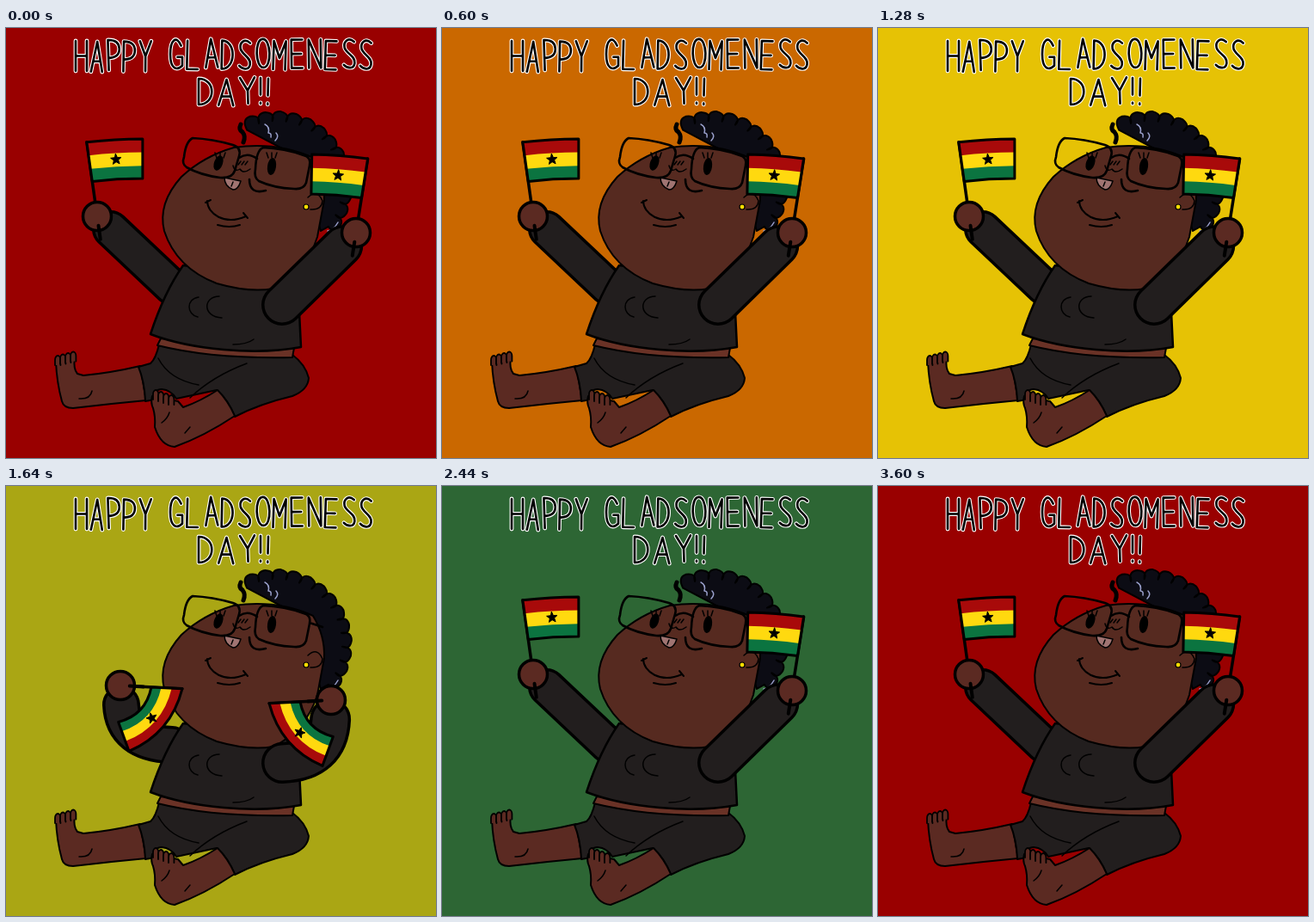
Animation, 500 px wide and 500 px high, one loop 3640 ms. Source, as an HTML page:

```html
<!DOCTYPE html>
<html lang="en">
<head>
<meta charset="utf-8">
<title>Happy Gladsomeness Day</title>
<style>
html, body { margin: 0; width: 100%; height: 100%; overflow: hidden; background: #900; }
svg { display: block; width: 100vw; height: 100vh; }
svg * { stroke-linecap: round; stroke-linejoin: round; }
.skin { fill: #562a20; }
.limb { fill: #5b2a22; }
.cloth { fill: #221e1e; }
.line, #title path { fill: none; }
#title path { vector-effect: non-scaling-stroke; }
</style>
</head>
<body>
<svg viewBox="0 0 500 500" stroke="#000" stroke-width="2" role="img" aria-label="Happy Gladsomeness Day!!">
  <g id="title"></g>
  <g id="leftSleeve" class="line"></g>

  <g id="legs">
    <path class="limb" d="M156 393Q122 401 90 404L83 402Q78 396 80 384L58 388Q59 412 65 434Q67 442 78 442Q120 437 163 433Z"/>
    <path class="cloth" d="M178 368Q174 385 168 390L154 394Q161 411 162 434L173 432Q172 420 181 420Q192 421 198 431L245 421Q259 433 266 452Q295 437 333 428Q351 421 352 407Q348 391 333 380Z"/>
    <path class="limb" d="M246 421Q226 434 206 441L200 434L170 428Q168 436 171 442Q174 452 173 464Q180 486 196 487Q230 475 266 451Q258 433 246 421Z"/>
    <path class="line" stroke-width="1.5" d="M85 431Q98 432 100 422M181 459Q188 454 190 447M208 471L214 464M177 384Q190 409 224 415M214 430Q240 405 280 390"/>
    <g id="toes" class="limb" stroke-width="1.8"></g>
  </g>

  <path fill="#6a3226" d="M180 361L176 369Q240 385 333 383L335 372Z"/>
  <path class="cloth" stroke-width="2.5" d="M206 276Q184 307 168 356C215 374 290 381 343 371L341 330L325 290Z"/>
  <path class="line" stroke-width="1.5" d="M224 313C209 315 210 333 223 336M248 312C229 312 228 336 251 337M264 368Q280 368 288 362"/>

  <g id="head">
    <path id="hair" fill="#0c0c14"/>
    <path class="line" stroke-width="5" d="M273 112Q270 118 275 121Q279 126 276 133"/>
    <path class="line" stroke="#9aa0cc" stroke-width="1.5" d="M301 112Q307 115 305 122Q309 122 308 127M314 122Q318 126 313 131M374 236Q381 235 386 226"/>
    <path class="skin" d="M265 139Q230 149 204 173Q176 204 184 236Q198 279 245 297Q283 308 311 303Q349 284 362 243L370 200Q371 174 357 151Q316 132 265 139Z"/>
    <path class="skin" stroke-width="1.5" d="M351 197Q362 187 368 201Q367 212 354 211"/>
    <circle cx="349" cy="208" r="3" fill="#fd0" stroke-width="1.2"/>
    <path class="line" d="M234 201C234 216 254 230 279 219M232 203L238 200M246 229Q260 233 272 229M276 215L281 221"/>
    <path fill="#a07472" stroke-width="1.5" d="M254 174L273 178Q270 188 264 188Q254 184 254 174Z"/>
    <path class="line" stroke-width="1.5" d="M262 184L264 179M264 160Q266 168 272 164Q276 170 284 164"/>
    <ellipse cx="247" cy="157" rx="4" ry="8" transform="rotate(20 247 157)"/>
    <ellipse cx="309" cy="161" rx="4" ry="9" transform="rotate(8 309 161)"/>
    <g id="lashes" stroke-width="1.5"></g>
    <path class="line" stroke-width="2.6" d="M217 128Q240 129 264 136Q274 139 271 149L266 166Q263 175 249 174Q226 171 210 162Q204 158 207 150Q209 132 217 128ZM299 139Q324 140 346 148Q355 150 353 160L349 180Q346 188 335 187Q311 186 294 178Q288 174 290 164Q291 142 299 139ZM271 151Q281 144 292 152M353 159L368 164M283 176Q283 194 302 189"/>
  </g>

  <g id="rightSleeve" class="line"></g>
  <g id="flags"></g>
</svg>

<script>
const FRAME = 40, LOOP = 3640, CYCLE = 600;
const $ = id => document.getElementById(id);
const repeat = (n, make) => Array.from({ length: n }, (_, i) => make(i)).join('');
const mix = (a, b, k) => a.map((v, i) => v + (b[i] - v) * k);
// The point at a distance from [x, y], in a direction in degrees
const move = ([x, y], degrees, distance) => {
  const a = degrees * Math.PI / 180;
  return [x + distance * Math.cos(a), y + distance * Math.sin(a)];
};

// Hand-lettered strokes on a 10 x 10 cell
const GLYPHS = {
  H: 'M0 0V10M10 0V10M0 5H10',
  A: 'M0 10L5 0L10 10M2 6.5H8',
  P: 'M0 10V0Q10 0 10 3T0 6',
  Y: 'M0 0L5 5L10 0M5 5V10',
  G: 'M9 2C5 -2 0 0 0 5S5 11 10 9V6H6',
  L: 'M0 0V10H9',
  D: 'M0 0V10C12 10 12 0 0 0',
  S: 'M9 1C4 -1 0 1 1 3S10 6 9 8.5S2 10 0 9',
  O: 'M5 0C-2 0 -2 10 5 10S12 0 5 0',
  M: 'M0 10V0L5 6L10 0V10',
  E: 'M9 0H0V10H9M0 5H8',
  N: 'M0 10V0L10 10V0',
  '!': 'M5 0V6.5M5 9.6V10'
};

function write(word, x, y, width, height, step) {
  $('title').innerHTML += repeat(word.length, i => {
    const wobble = Math.sin(i * 2.3);
    const place = `translate(${x + i * step} ${y + wobble}) rotate(${wobble * 2}) scale(${width / 10} ${height / 10})`;
    const stroke = (color, size) =>
      `<path d="${GLYPHS[word[i]]}" transform="${place}" stroke="${color}" stroke-width="${size}"/>`;
    return stroke('#fff', 4.8) + stroke('#000', 2.6);
  });
}

function drawDetails() {
  write('HAPPY', 81, 15, 13, 35, 18.7);
  write('GLADSOMENESS', 191, 14, 14, 33, 20.1);
  write('DAY', 224, 59, 17, 30, 24);
  write('!!', 291, 58, 10, 30, 9);

  const toes = (x, y, slope) => repeat(4, i =>
    `<path d="M${x + i * 6} ${y + i * slope + 4}v-6a3.2 5 0 0 1 6.4 0v6"/>`);
  $('toes').innerHTML = toes(57, 388, -1.5) + toes(171, 428, 2);

  const lashes = (x, y) => repeat(3, i => `<path d="M${x + i * 4} ${y}l${i * 2 - 2} -6"/>`);
  $('lashes').innerHTML = lashes(245, 151) + lashes(305, 151)
    + repeat(3, i => `<path d="M${270 + i * 4} 159l3 -4"/>`);

  // Pointed tufts around the crown
  const crown = [315, 184], count = 13, start = -118, step = 12;
  $('hair').setAttribute('d', `M${move(crown, start, 74)}` + repeat(count, i => {
    const a = start + i * step;
    return `Q${move(crown, a, 88)} ${move(crown, a + 7, 87)}Q${move(crown, a + 15, 85)} ${move(crown, a + step, 76)}`;
  }) + 'L366 236L340 150Z');
}

// Arm: hand x, hand y, pole angle, cloth curl, elbow bend
const LEFT = { side: 1, shoulder: [193, 301], width: 40,
  up: [106, 219, 262, 8, 0], down: [143, 234, 48, 74, 1], in: [133, 232, 3, 67, 1] };
const RIGHT = { side: -1, shoulder: [321, 322], width: 44,
  up: [407, 238, -81, 8, 0], down: [379, 254, 71, 40, 1], in: [378, 249, 177, 67, 1] };

// Held drawings: up, swinging out, down, folded in, rising
function poses({ side, up, down, in: folded }) {
  const out = mix(up, down, 0.5);
  out[0] -= 28 * side;
  const nextUp = up.map((v, i) => i === 2 ? v - 360 * side : v);
  return [up, out, down, folded, mix(folded, nextUp, 0.5)];
}
LEFT.poses = poses(LEFT);
RIGHT.poses = poses(RIGHT);

function sleeve({ shoulder, width }, [x, y, , , bend]) {
  const elbow = mix(mix([x, y], shoulder, 0.5), [x, shoulder[1] + 2], bend * 0.9);
  const toElbow = Math.atan2(elbow[1] - y, elbow[0] - x) * 180 / Math.PI;
  const d = `M${move([x, y], toElbow, 22)}Q${elbow} ${shoulder}`;
  return `<path d="${d}" stroke-width="${width + 4}"/><path d="${d}" stroke="#221e1e" stroke-width="${width - 3}"/>`;
}

function star([x, y], angle) {
  const points = Array.from({ length: 10 }, (_, i) => move([x, y], angle + i * 36, i % 2 ? 2.8 : 6.5));
  return `<polygon points="${points.join(' ')}" stroke-width="1"/>`;
}

function flag({ side }, [x, y, angle, curl, bend]) {
  const hand = [x, y], tip = move(hand, angle, 87 - 15 * bend);
  const height = 46 - 10 * bend, half = 31 + 12 * bend;
  // Centre line of the cloth: pole, middle, tail
  const turns = [0, 0.15, 1].map(k => side * curl * k);
  const pole = move(tip, angle, -height / 2);
  const middle = move(pole, angle + side * 90 + turns[1], half);
  const tail = move(middle, angle + side * 90 + turns[2], half);
  const spine = [pole, middle, tail];
  const edge = k => spine.map((p, i) => move(p, angle + (turns[i] + (i === 1 ? turns[2] * 0.35 : 0)), height * (0.5 - k)));
  const band = (from, to, attrs) => {
    const [a, b, c] = edge(from), [d, e, f] = edge(to);
    return `<path d="M${a}Q${b} ${c}L${f}Q${e} ${d}Z" ${attrs}/>`;
  };
  const center = mix(mix(pole, middle, 0.5), mix(middle, tail, 0.5), 0.5);
  const grip = Math.sin(angle * Math.PI / 180) < -0.6 ? -27 : 27;
  return `<path d="M${hand}L${tip}" stroke-width="3.5"/>`
    + band(0, 0.36, 'fill="#a80a0a" stroke="none"')
    + band(0.34, 0.7, 'fill="#ffd90f" stroke="none"')
    + band(0.68, 1, 'fill="#0b7440" stroke="none"')
    + band(0, 1, 'fill="none" stroke-width="3"')
    + star(center, angle + turns[2] / 2)
    + `<circle class="limb" cx="${x}" cy="${y}" r="16.5" stroke-width="3.5"/>`
    + `<path d="M${move(hand, angle, grip * 0.4)}L${move(hand, angle, grip)}" stroke-width="4"/>`;
}

const RED = [153, 0, 0];
const SKY = [[0, RED], [1170, [248, 203, 0]], [2410, [42, 105, 53]], [3600, RED], [LOOP, RED]];
function sky(t) {
  const i = SKY.findIndex(([end]) => end > t);
  const [start, from] = SKY[i - 1], [end, to] = SKY[i];
  return `rgb(${mix(from, to, (t - start) / (end - start)).map(Math.round)})`;
}

let shown = -1;
function draw(now) {
  const t = Math.floor(now % LOOP / FRAME) * FRAME;
  const pose = Math.floor(t % CYCLE / (CYCLE / LEFT.poses.length));
  document.body.style.background = sky(t);
  if (pose === shown) return;
  shown = pose;
  $('leftSleeve').innerHTML = sleeve(LEFT, LEFT.poses[pose]);
  $('rightSleeve').innerHTML = sleeve(RIGHT, RIGHT.poses[pose]);
  $('flags').innerHTML = flag(LEFT, LEFT.poses[pose]) + flag(RIGHT, RIGHT.poses[pose]);
}

drawDetails();
const begin = performance.now();
function tick() {
  draw(performance.now() - begin);
  requestAnimationFrame(tick);
}
tick();
</script>
</body>
</html>
```
